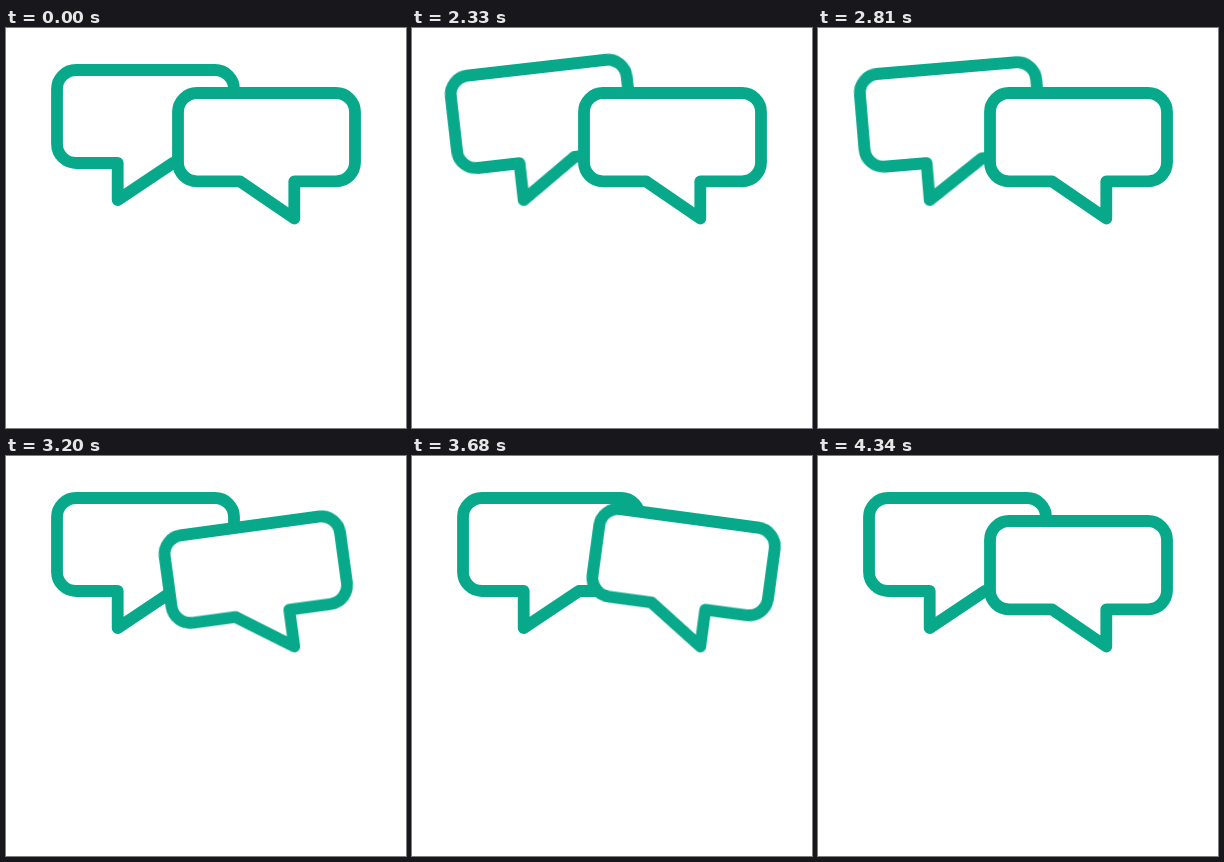
Recreate the animation shown at these times as an HTML page without scripts. Size 400x400 px, loop 4.55 s.

```html
<!DOCTYPE html>
<html lang="en">
<head>
<meta charset="utf-8">
<title>Chat bubbles</title>
<style>
  html, body {
    margin: 0;
    width: 100%;
    height: 100%;
    overflow: hidden;
    background: #fff;
  }

  svg {
    display: block;
    width: 100%;
    height: 100%;
  }

  .bubble {
    fill: #fff;
    stroke: #07a98a;
    stroke-width: 11.8;
    stroke-linecap: round;
    stroke-linejoin: round;
    animation: 4550ms cubic-bezier(.37, 0, .63, 1) infinite;
  }

  /* Each bubble swings on the tip of its tail. */
  .back {
    transform-origin: 111.7px 172px;
    animation-name: swing-back;
  }

  .front {
    transform-origin: 288.3px 190.5px;
    animation-name: swing-front;
  }

  @keyframes swing-back {
    0%, 43.52% { transform: rotate(0deg); }
    48.9%  { transform: rotate(-20deg); }
    54.29% { transform: rotate(14.3deg); }
    59.67% { transform: rotate(-8.5deg); }
    65.05% { transform: rotate(2.6deg); }
    70.44%, 100% { transform: rotate(0deg); }
  }

  @keyframes swing-front {
    0%, 68.02% { transform: rotate(0deg); }
    73.47% { transform: rotate(-20deg); }
    78.92% { transform: rotate(14.3deg); }
    84.37% { transform: rotate(-8.5deg); }
    89.82% { transform: rotate(2.6deg); }
    95.27%, 100% { transform: rotate(0deg); }
  }
</style>
</head>
<body>
<svg viewBox="0 0 400 400">
  <path class="bubble back" d="M70 42H209a19 19 0 0 1 19 19V116a19 19 0 0 1 -19 19H167L111.7 172V135H70a19 19 0 0 1 -19 -19V61a19 19 0 0 1 19 -19Z"/>
  <path class="bubble front" d="M191 65H330a19 19 0 0 1 19 19V134.300a19 19 0 0 1 -19 19H288.300V190.500L234 153.300H191a19 19 0 0 1 -19 -19V84a19 19 0 0 1 19 -19Z"/>
</svg>
</body>
</html>
```
